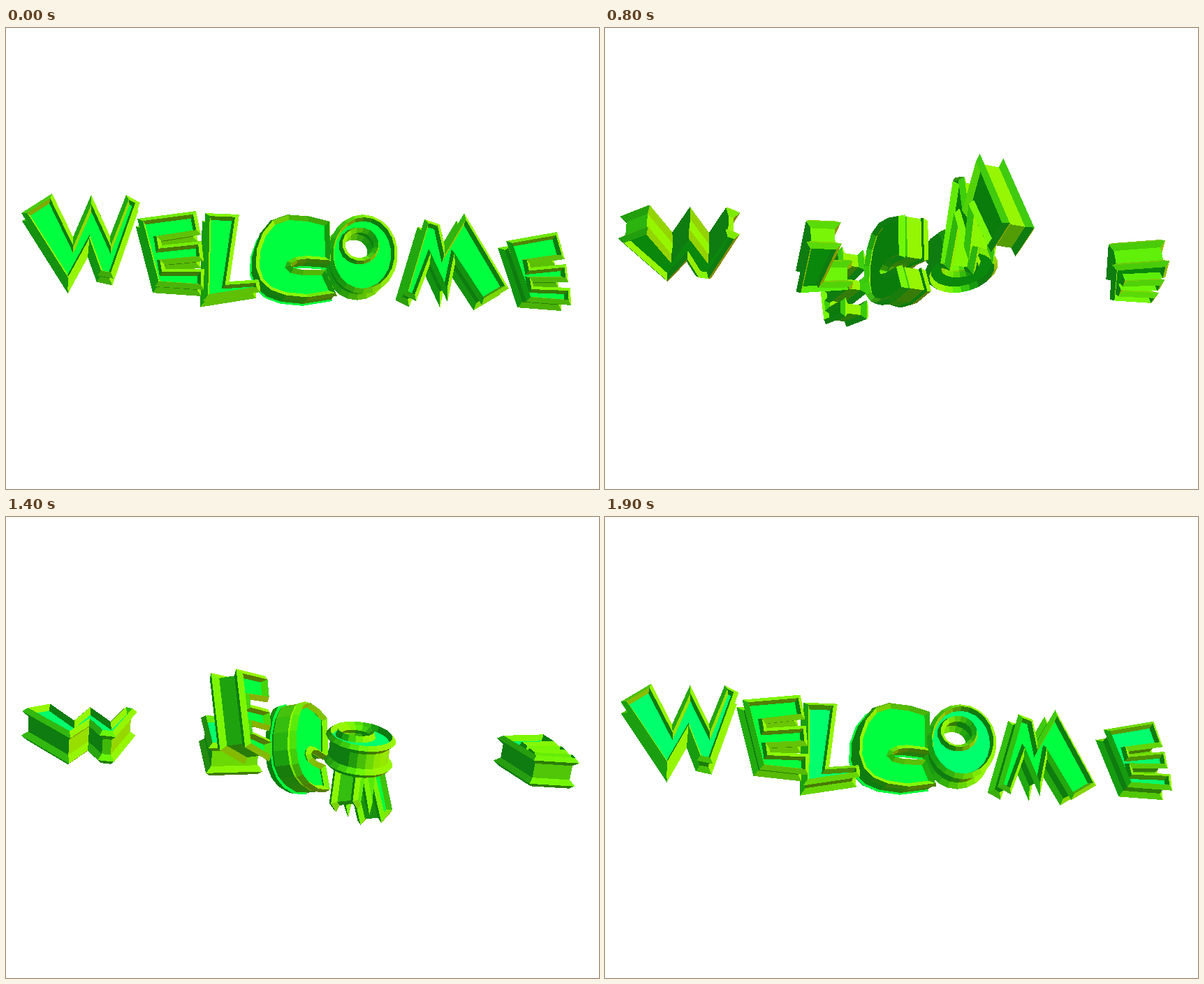
Animation of 849x660 px, one loop 2000 ms. Source, as an HTML page with a canvas:

```html
<!DOCTYPE html>
<html lang="en">
<head>
<meta charset="utf-8">
<title>Welcome</title>
<style>
  html, body { margin: 0; width: 100%; height: 100%; overflow: hidden; background: #fff; }
  canvas { display: block; width: 849px; height: 660px; }
</style>
</head>
<body>
<canvas id="stage" width="849" height="660" role="img" aria-label="WELCOME"></canvas>
<script>
const W = 849, H = 660, CX = 424.5, CY = 330, EYE = 1750;
const RAD = Math.PI / 180;
const YAW = 11 * RAD, PITCH = 16 * RAD;
const sinYaw = Math.sin(YAW), cosYaw = Math.cos(YAW);
const sinPitch = Math.sin(PITCH), cosPitch = Math.cos(PITCH);

const STEP_MS = 100, STEPS = 20, STEP_DEG = 9;
const RIM_Z = 18;
// Cross-section of a letter from front to back: [inset from the outline, depth].
const HALF = [[9, 15], [6, 24], [0, RIM_Z], [7, 11]];
const PROFILE = [...HALF, ...HALF.map(([inset, z]) => [inset, -z]).reverse()];

const ctx = document.getElementById('stage').getContext('2d');
const image = ctx.createImageData(W, H);
const pixels = new Uint32Array(image.data.buffer);
const depth = new Float32Array(W * H);

// World axes: x right, y down, z towards the viewer.
function toView([x, y, z]) {
  const depthZ = z * cosYaw - x * sinYaw;
  return [x * cosYaw + z * sinYaw, y * cosPitch - depthZ * sinPitch, y * sinPitch + depthZ * cosPitch];
}

function toWorld([x, y, z]) {
  const depthZ = z * cosPitch - y * sinPitch;
  return [x * cosYaw - depthZ * sinYaw, y * cosPitch + z * sinPitch, x * sinYaw + depthZ * cosYaw];
}

function project([x, y, z]) {
  const scale = EYE / (EYE - z);
  return [CX + x * scale, CY + y * scale];
}

// Finds the point of the front rim plane that appears at a stage position.
function onRim([u, v]) {
  const eye = toWorld([0, 0, EYE]);
  const ray = toWorld([u - CX, v - CY, -EYE]);
  const t = (RIM_Z - eye[2]) / ray[2];
  return [eye[0] + ray[0] * t, eye[1] + ray[1] * t];
}

// Moves a clockwise outline inwards with mitred corners.
function inset(outline, amount) {
  const n = outline.length;
  const inward = outline.map(([x, y], i) => {
    const [nx, ny] = outline[(i + 1) % n];
    const length = Math.hypot(nx - x, ny - y);
    return [(y - ny) / length, (nx - x) / length];
  });
  return outline.map(([x, y], i) => {
    const a = inward[(i + n - 1) % n], b = inward[i];
    const k = amount / Math.max(0.2, 1 + a[0] * b[0] + a[1] * b[1]);
    return [x + (a[0] + b[0]) * k, y + (a[1] + b[1]) * k];
  });
}

const pairs = text => text.split(' ').map(p => p.split(',').map(Number));

function ellipse(cx, cy, rx, ry, count, direction) {
  return Array.from({ length: count }, (_, i) => {
    const a = direction * (i + 0.5) / count * 2 * Math.PI;
    return [cx + rx * Math.cos(a), cy + ry * Math.sin(a)];
  });
}

function letter(axis, ...outlines) {
  const rings = outlines.map(outline => {
    const rim = outline.map(onRim);
    return PROFILE.map(([amount, z]) => inset(rim, amount).map(([x, y]) => [x, y, z]));
  });
  return { axis, rings };
}

const letters = [
  letter('x', pairs('22,265 66,237 96,299 122,239 149,298 172,239 192,250 154,359 131,354 118,318 89,371')),
  letter('y', pairs('188,273 272,262 279,296 222,305 223,311 280,305 283,334 227,339 228,345 284,345 284,375 213,370')),
  letter('x', pairs('285,265 334,267 320,363 363,360 364,378 282,391')),
  letter('y', pairs('455,333 457,328 456,283 432,277 405,275 385,282 372,298 364,320 363,343 369,360 381,371 ' +
    '400,378 430,381 462,376 452,354 425,354 408,351 399,343 403,334 414,328 430,326').slice(1)),
  letter('x', ellipse(511, 324, 50, 57, 22, 1), ellipse(506, 311, 20, 18, 16, -1)),
  letter('y', pairs('599,274 621,281 628,312 656,265 720,373 681,396 643,338 632,392 607,338 587,391 567,381')),
  letter('x', pairs('716,305 789,292 800,331 750,338 751,343 802,338 805,364 754,364 755,370 808,372 809,397 745,392'))
];

function turn([x, y, z], axis, angle) {
  const s = Math.sin(angle), c = Math.cos(angle);
  return axis === 'x' ? [x, y * c + z * s, z * c - y * s] : [x * c - z * s, y, z * c + x * s];
}

// Unit normal of a planar polygon, facing the eye.
function normalOf(points) {
  const n = [0, 0, 0];
  points.forEach((p, i) => {
    const q = points[(i + 1) % points.length];
    n[0] += (p[1] - q[1]) * (p[2] + q[2]);
    n[1] += (p[2] - q[2]) * (p[0] + q[0]);
    n[2] += (p[0] - q[0]) * (p[1] + q[1]);
  });
  const [x, y, z] = points[0];
  const facing = n[2] * (EYE - z) - n[0] * x - n[1] * y;
  const k = Math.sign(facing) / (Math.hypot(...n) || 1);
  return n.map(v => v * k);
}

const clamp = (v, low, high) => Math.min(high, Math.max(low, v));

function shade([x, down, z], isFace) {
  const up = -down;
  let r, g, b;
  if (isFace) {
    g = clamp(168 + 130 * x + 120 * up + 110 * z, 124, 255);
    r = g < 250 ? 10 : 0;
    b = up > 0.32 ? 108 : clamp((g - 110) * 0.44, 12, 64);
  } else {
    r = clamp(80 + 120 * x + 40 * up, 14, 150);
    g = clamp(110 + 110 * x + 80 * up + 110 * z, 124, 246);
    b = clamp(10 - 14 * x, 0, 16);
  }
  return (255 << 24 | b << 16 | g << 8 | r) >>> 0;
}

// Even-odd scanline fill of one planar polygon with depth test.
function fill(contours, isFace) {
  const n = normalOf(contours[0]);
  const [px, py, pz] = contours[0][0];
  const distance = n[0] * px + n[1] * py + n[2] * (pz - EYE);
  if (Math.abs(distance) < 1e-6) return;
  const color = shade(n, isFace);
  const edges = [];
  let top = H, bottom = 0;
  for (const contour of contours) {
    const flat = contour.map(project);
    flat.forEach((p, i) => {
      edges.push([p, flat[(i + 1) % flat.length]]);
      top = Math.min(top, p[1]);
      bottom = Math.max(bottom, p[1]);
    });
  }
  const last = Math.min(H - 1, Math.floor(bottom));
  for (let row = Math.max(0, Math.floor(top)); row <= last; row++) {
    const y = row + 0.5, hits = [];
    for (const [a, b] of edges) {
      if ((a[1] <= y) !== (b[1] <= y)) hits.push(a[0] + (y - a[1]) / (b[1] - a[1]) * (b[0] - a[0]));
    }
    hits.sort((a, b) => a - b);
    for (let i = 0; i + 1 < hits.length; i += 2) {
      const end = Math.min(W, Math.ceil(hits[i + 1] - 0.5));
      for (let col = Math.max(0, Math.ceil(hits[i] - 0.5)); col < end; col++) {
        const near = (n[0] * (col + 0.5 - CX) + n[1] * (y - CY) - n[2] * EYE) / distance;
        const at = row * W + col;
        if (near > depth[at]) {
          depth[at] = near;
          pixels[at] = color;
        }
      }
    }
  }
}

function drawLetter({ axis, rings }, angle) {
  const placed = rings.map(stack => stack.map(ring => ring.map(p => toView(turn(p, axis, angle)))));
  fill(placed.map(stack => stack[0]), true);
  fill(placed.map(stack => stack[stack.length - 1]), true);
  for (const stack of placed) {
    for (let k = 0; k + 1 < stack.length; k++) {
      const a = stack[k], b = stack[k + 1];
      a.forEach((p, i) => {
        const j = (i + 1) % a.length;
        fill([[p, a[j], b[j], b[i]]], false);
      });
    }
  }
}

function draw(step) {
  const degrees = step * STEP_DEG;
  const angle = (degrees > 90 ? degrees - 180 : degrees) * RAD;
  pixels.fill(0xffffffff);
  depth.fill(0);
  letters.forEach(item => drawLetter(item, angle));
  ctx.putImageData(image, 0, 0);
}

let shown = 0;
const start = performance.now();
draw(0);

function tick() {
  const step = Math.floor((performance.now() - start) / STEP_MS) % STEPS;
  if (step !== shown) draw(shown = step);
  requestAnimationFrame(tick);
}
requestAnimationFrame(tick);
</script>
</body>
</html>
```
